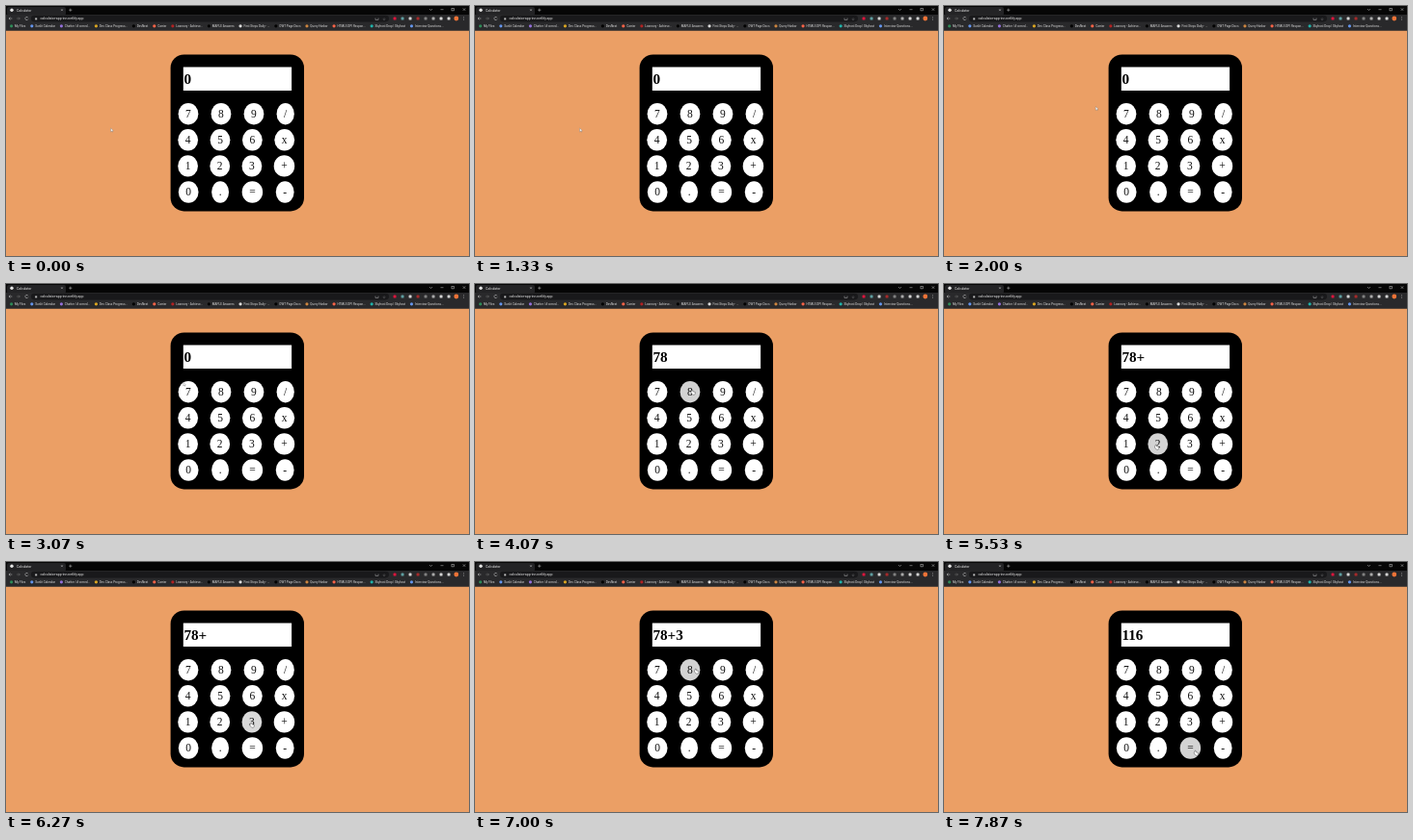
Recreate the animation shown at these times as an HTML page with a canvas. Size 480 by 260 pixels, loop 8000 ms.

```html
<!DOCTYPE html>
<html lang="en">
<head>
<meta charset="utf-8">
<title>Calculator</title>
<style>
  html, body { margin: 0; width: 100%; height: 100%; overflow: hidden; background: #eb9f65; }
  canvas { display: block; width: 480px; height: 260px; }
</style>
</head>
<body>
<canvas id="stage" width="480" height="260"></canvas>
<script>
const ctx = document.getElementById('stage').getContext('2d');
const LOOP = 8000;
const FADE = 150;
const SANS = 'Roboto, sans-serif';
const KEY_FONT = '11.5px "Liberation Serif", serif';
const ENTRY_FONT = 'bold 15.2px "Liberation Serif", serif';
const BOOKMARK_FONT = '3.1px ' + SANS;

// Pointer moves: start, end, x, y; it rests in between
const home = [108.3, 126.8];
const moves = [
  [1480, 2260, 174, 96.5], [2260, 2600, 262, 43], [2600, 3070, 183.5, 102],
  [3130, 3450, 188, 111], [3690, 3930, 224.7, 110], [4270, 4700, 289, 167],
  [4960, 5190, 257, 190], [5190, 5430, 219.3, 167], [5800, 6330, 255, 167],
  [6640, 6900, 228.3, 111], [7120, 7400, 270.5, 207], [7470, 7700, 260, 196]
];
const presses = [[3670, '7'], [4040, '8'], [4930, '+'], [6600, '3'], [7080, '8'], [7840, '=']];

const bookmarks = [
  ['My Files', 'seagreen'], ['Sunlit Calendar', 'cornflowerblue'],
  ['Chatter | # a-med...', 'mediumpurple'], ['Dev Class Progress...', 'goldenrod'],
  ['DevNest', 'black'], ['Carrier', 'tomato'], ['Learnory - Achieve...', 'firebrick'],
  ['MAPLE Answers', 'black'], ['First Steps Daily - ...', 'gainsboro'],
  ['OWT Page Docs', 'black'], ['Query Harbor', 'peru'], ['HTML5 DPI Respon...', 'tomato'],
  ['Skyhost Drop | Skyhost', 'lightseagreen'], ['Interview Questions...', 'cornflowerblue']
];
const tools = ['crimson', 'cadetblue', 'lightgray', 'brown', 'gray', 'darkgray', 'lightgray', 'lightgray'];

function textWidth(str, font) {
  ctx.font = font;
  return ctx.measureText(str).width;
}

// Each row spreads its keys with equal space around them
function layoutKeys() {
  const left = 172, width = 133.4, padding = 15;
  return ['789/', '456x', '123+', '0.=-'].flatMap((labels, row) => {
    const widths = [...labels].map(label => textWidth(label, KEY_FONT) + padding);
    const gap = (width - widths.reduce((a, b) => a + b)) / widths.length;
    let x = left + gap / 2;
    return widths.map((w, i) => {
      const key = { label: labels[i], x: x + w / 2, y: 112.2 + 27.1 * row, rx: w / 2, ry: 11.2 };
      x += w + gap;
      return key;
    });
  });
}
const keys = layoutKeys();

function rect(x, y, w, h, color, radius = 0) {
  ctx.fillStyle = color;
  ctx.beginPath();
  ctx.roundRect(x, y, w, h, radius);
  ctx.fill();
}

function oval(x, y, rx, ry, color) {
  ctx.fillStyle = color;
  ctx.beginPath();
  ctx.ellipse(x, y, rx, ry, 0, 0, Math.PI * 2);
  ctx.fill();
}

function text(str, x, y, font, color, align = 'left') {
  ctx.font = font;
  ctx.fillStyle = color;
  ctx.textAlign = align;
  ctx.fillText(str, x, y);
}

function line(color, ...points) {
  ctx.strokeStyle = color;
  ctx.lineWidth = 0.5;
  ctx.beginPath();
  points.forEach(p => ctx.lineTo(...p));
  ctx.stroke();
}

function cross(x, y, r) {
  line('#ccc', [x - r, y - r], [x + r, y + r]);
  line('#ccc', [x + r, y - r], [x - r, y + r]);
}

function arrow(x, y, dir, color) {
  line(color, [x - 1.7 * dir, y], [x + 1.7 * dir, y]);
  line(color, [x + 0.3 * dir, y - 1.4], [x + 1.7 * dir, y], [x + 0.3 * dir, y + 1.4]);
}

function pointerAt(t) {
  let [x, y] = home;
  for (const [start, end, toX, toY] of moves) {
    const u = Math.min(1, Math.max(0, (t - start) / (end - start)));
    const eased = u * u * (3 - 2 * u);
    x += (toX - x) * eased;
    y += (toY - y) * eased;
  }
  return [x, y];
}

function entryAt(t) {
  const typed = presses.filter(([time]) => time <= t).map(([, label]) => label).join('');
  if (!typed.endsWith('=')) return typed || '0';
  return String(typed.slice(0, -1).split('+').reduce((sum, n) => sum + Number(n), 0));
}

const inside = (key, [x, y]) => ((x - key.x) / key.rx) ** 2 + ((y - key.y) / key.ry) ** 2 < 1;

function drawTabs() {
  rect(0, 0, 480, 9, '#060606');
  rect(1, 1, 61, 9, '#232325', 2);
  oval(6, 4.3, 1.7, 1.7, '#e5e5e5');
  text('Calculator', 11, 5.6, '3.4px ' + SANS, '#eee');
  cross(58, 4.2, 0.9);
  line('#ccc', [65.2, 4.2], [68.4, 4.2]);
  line('#ccc', [66.8, 2.6], [66.8, 5.8]);
  line('#ccc', [439, 3], [440.5, 4.5], [442, 3]);
  line('#ccc', [450.5, 3.7], [453.5, 3.7]);
  ctx.strokeRect(462, 2.3, 2.6, 2.6);
  cross(475, 3.6, 1.2);
}

function drawToolbar() {
  rect(0, 9, 480, 16.7, '#29292b');
  rect(26, 9.8, 371, 6.6, '#19191b', 3.3);
  arrow(4.7, 13, -1, '#ccc');
  arrow(12.7, 13, 1, '#777');
  ctx.strokeStyle = '#ddd';
  ctx.beginPath();
  ctx.arc(21.5, 13, 1.6, 0.4, 5.7);
  ctx.stroke();
  rect(30.2, 12.4, 2, 2, '#bbb');
  text('calculator-app-inn.netlify.app', 35.5, 14.3, '3.5px ' + SANS, '#eee');
  line('#bbb', [383, 12.5], [383, 14.4], [386, 14.4], [386, 12.5]);
  text('☆', 392, 14.5, '4px "DejaVu Sans", sans-serif', '#bbb', 'center');
  tools.forEach((color, i) => rect(401.6 + 8 * i, 11.6, 2.9, 2.9, color, 0.6));
  oval(466.8, 13, 2.4, 2.4, '#ed7337');
  for (let i = -1; i <= 1; i++) oval(474.5, 13 + 1.6 * i, 0.4, 0.4, '#ccc');
}

function drawBookmarks() {
  const widths = bookmarks.map(([label]) => textWidth(label, BOOKMARK_FONT));
  const gap = (444.5 - widths.reduce((a, b) => a + b)) / (bookmarks.length - 1);
  let x = 9;
  bookmarks.forEach(([label, color], i) => {
    oval(x - 3.4, 20.8, 1.6, 1.6, color);
    text(label, x, 21.9, BOOKMARK_FONT, '#ddd');
    x += widths[i] + gap;
  });
}

function drawCalculator(t) {
  rect(170.6, 50.5, 138.4, 162.9, '#000', 14);
  rect(183.8, 63.6, 112.3, 24.5, '#fff');
  text(entryAt(t), 184.4, 81.1, ENTRY_FONT, '#000');

  // The hover tint is the share of recent moments spent over the key
  const steps = 15;
  const recent = Array.from({ length: steps }, (_, i) => pointerAt(t - i * FADE / steps));
  for (const key of keys) {
    const hover = recent.filter(p => inside(key, p)).length / steps;
    const shade = Math.round(255 - 44 * hover);
    oval(key.x, key.y, key.rx, key.ry, `rgb(${shade},${shade},${shade})`);
    text(key.label, key.x, key.y + 3.8, KEY_FONT, '#111', 'center');
  }
}

function drawPointer([x, y]) {
  const overKey = keys.some(key => inside(key, [x, y]));
  const outline = overKey
    ? [[0, 0.3], [0.8, 0], [1.2, 1.8], [3.6, 2.4], [3.6, 4], [2.8, 5.2], [1, 5.2], [-0.9, 3]]
    : [[0.3, 0.3], [0.3, 4], [1.3, 3.3], [2, 4.4], [2, 3], [3, 2.9]];
  ctx.beginPath();
  outline.forEach(([dx, dy]) => ctx.lineTo(x + dx, y + dy));
  ctx.closePath();
  ctx.lineWidth = 0.4;
  ctx.strokeStyle = overKey ? '#222' : '#777';
  ctx.fillStyle = '#fff';
  ctx.fill();
  ctx.stroke();
}

function draw(now) {
  const t = now % LOOP;
  rect(0, 0, 480, 260, '#eb9f65');
  drawTabs();
  drawToolbar();
  drawBookmarks();
  drawCalculator(t);
  drawPointer(pointerAt(t));
}

let start;
function frame(now) {
  start ??= now;
  draw(now - start);
  requestAnimationFrame(frame);
}
draw(0);
requestAnimationFrame(frame);
</script>
</body>
</html>
```
